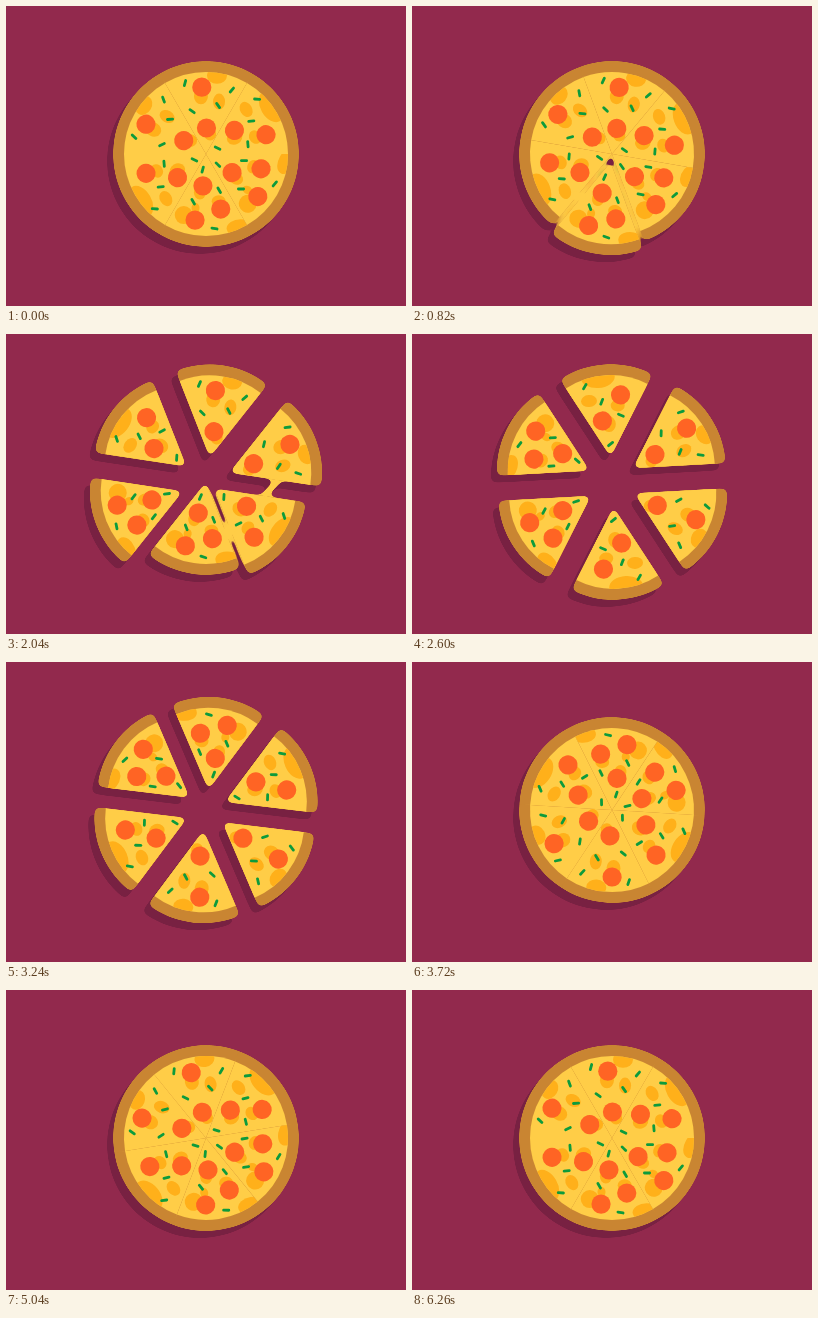
An HTML page for the animation above (7000 ms loop, 400 px wide and 300 px high).

```html
<!DOCTYPE html>
<html lang="en">
<head>
<meta charset="utf-8">
<title>Pizza</title>
<style>
  html, body { margin: 0; width: 100%; height: 100%; overflow: hidden; background: #92294d; }
  svg { display: block; width: 100%; height: 100%; }
</style>
</head>
<body>
<svg id="stage" viewBox="0 0 400 300">
  <defs>
    <filter id="melt" filterUnits="userSpaceOnUse" x="0" y="0" width="400" height="300" color-interpolation-filters="sRGB">
      <feGaussianBlur in="SourceGraphic" stdDeviation="3"/>
      <feColorMatrix values="1 0 0 0 0  0 1 0 0 0  0 0 1 0 0  0 0 0 16 -7.5" result="goo"/>
      <feComposite in="SourceGraphic" in2="goo" operator="atop" result="pizza"/>
      <feOffset in="goo" dx="-6" dy="7" result="cast"/>
      <feFlood flood-color="#782142"/>
      <feComposite in2="cast" operator="in" result="shadow"/>
      <feMerge><feMergeNode in="shadow"/><feMergeNode in="pizza"/></feMerge>
    </filter>
    <clipPath id="wedge"><path id="wedgePath"/></clipPath>
    <clipPath id="cheese"><path id="cheesePath"/></clipPath>
  </defs>
  <rect width="400" height="300" fill="#92294d"/>
  <g filter="url(#melt)"><g id="pizza"></g></g>
</svg>
<script>
const LOOP = 7000, CRUST = 93, CHEESE = 82, SPREAD = 25;
const RAD = Math.PI / 180;
const pizza = document.getElementById('pizza');

// Positions are [radius, degrees from the slice axis, ...].
// patches end with rx, ry; herbs end with their tilt against the axis.
const kinds = {
  X: {
    meat: [[67, -3.6], [26, 1]],
    herbs: [[74, -16.5, 195], [50, 14, 145], [69, 22, 40], [45, -18, 125]],
    patches: [[79, 8, 8, 10], [54, 14, 8, 6], [58, -5, 8, 7], [20, 12, 6, 6]]
  },
  Z: {
    meat: [[63, 12.2], [37, -9.7]],
    herbs: [[75, -17, 33], [43, 17, 115], [13, 3, 55], [56, -6, 25]],
    patches: [[81, -6, 11, 17], [60, -18, 6, 8], [52, 11, 6, 7], [33, 0, 8, 7]]
  },
  Y: {
    meat: [[67, 9.4], [32, 5.5], [57, -15]],
    herbs: [[38.6, -20, -30], [75, -6.5, 100], [49.5, 15, -30], [16, 12, 15]],
    patches: [[82, -25, 9, 14], [55, 11, 5, 4], [65, 20, 9, 9], [49, -15, 6, 7], [39, 9, 7, 6]]
  }
};

// Slices in the order they leave.
const slices = [['Y', 90], ['Z', 150], ['X', 210], ['X', 270], ['Z', 330], ['Y', 30]]
  .map(([kind, angle], i) => ({ kind, angle, start: 680 + 300 * i }));

function add(parent, tag, attrs) {
  const el = document.createElementNS('http://www.w3.org/2000/svg', tag);
  set(el, attrs);
  parent.appendChild(el);
  return el;
}
function set(el, attrs) {
  for (const key in attrs) el.setAttribute(key, attrs[key]);
}
function polar(r, deg) {
  return [r * Math.cos(deg * RAD), r * Math.sin(deg * RAD)];
}
function sector(r) {
  const [x, y] = polar(r, 30);
  return `M0 0L${x} ${-y}A${r} ${r} 0 0 1 ${x} ${y}Z`;
}
set(document.getElementById('wedgePath'), { d: sector(CRUST) });
set(document.getElementById('cheesePath'), { d: sector(CHEESE) });

function buildSlice(slice) {
  const { meat, herbs, patches } = kinds[slice.kind];
  slice.el = add(pizza, 'g', {});
  add(slice.el, 'path', { d: sector(CRUST), fill: '#c98532' });
  add(slice.el, 'path', { d: sector(CHEESE), fill: '#ffcd47' });
  const top = add(slice.el, 'g', { 'clip-path': 'url(#cheese)' });
  for (const [r, a, rx, ry] of patches) {
    const [cx, cy] = polar(r, a);
    add(top, 'ellipse', { cx, cy, rx, ry, fill: '#ffb01a' });
  }
  for (const [r, a] of meat) {
    const [cx, cy] = polar(r, a);
    add(top, 'circle', { cx, cy, r: 9.6, fill: '#ff6424' });
  }
  for (const [r, a, tilt] of herbs) {
    const [x, y] = polar(r, a);
    add(top, 'path', {
      d: 'M-2.6 0H2.6', transform: `translate(${x} ${y}) rotate(${tilt})`,
      stroke: '#0d9b3c', 'stroke-width': 2.8, 'stroke-linecap': 'round'
    });
  }
}
slices.forEach(buildSlice);
slices.slice(0, -1).forEach(s => {
  s.strand = add(pizza, 'line', { stroke: '#ffcd47' });
});

const clamp = x => Math.min(1, Math.max(0, x));
const sineInOut = x => (1 - Math.cos(Math.PI * x)) / 2;
const cubicInOut = x => x < 0.5 ? 4 * x ** 3 : 1 - 4 * (1 - x) ** 3;

function bezier(x1, y1, x2, y2) {
  const at = (a, b, s) => 3 * s * (1 - s) ** 2 * a + 3 * s * s * (1 - s) * b + s ** 3;
  return x => {
    if (x <= 0 || x >= 1) return clamp(x);
    let lo = 0, hi = 1;
    for (let i = 0; i < 30; i++) {
      const mid = (lo + hi) / 2;
      if (at(x1, x2, mid) < x) lo = mid; else hi = mid;
    }
    return at(y1, y2, lo);
  };
}
const spin = bezier(0.541, 0, 0.652, 1);

function offset(slice, t) {
  const out = sineInOut(clamp((t - slice.start) / 360));
  const back = cubicInOut(clamp((t - 3020) / 620));
  return SPREAD * out * (1 - back);
}
// Point on a slice's edge; side is 1 for the clockwise edge, -1 for the other.
function edgePoint(slice, t, side) {
  const [ex, ey] = polar(50, slice.angle + 30 * side);
  const [dx, dy] = polar(offset(slice, t), slice.angle);
  return [ex + dx, ey + dy];
}

function draw(t) {
  set(pizza, { transform: `translate(200 148) rotate(${360 * spin(t / 5560)})` });
  slices.forEach((slice, i) => {
    set(slice.el, { transform: `rotate(${slice.angle}) translate(${offset(slice, t)} 0)` });
    if (!slice.strand) return;
    const age = t - slice.start;
    const width = 15 - age * 0.019;
    const [x1, y1] = edgePoint(slice, t, 1);
    const [x2, y2] = edgePoint(slices[i + 1], t, -1);
    set(slice.strand, { x1, y1, x2, y2, 'stroke-width': age > 0 && width > 4 ? width : 0 });
  });
}

function tick() {
  draw(performance.now() % LOOP);
  requestAnimationFrame(tick);
}
tick();
</script>
</body>
</html>
```
